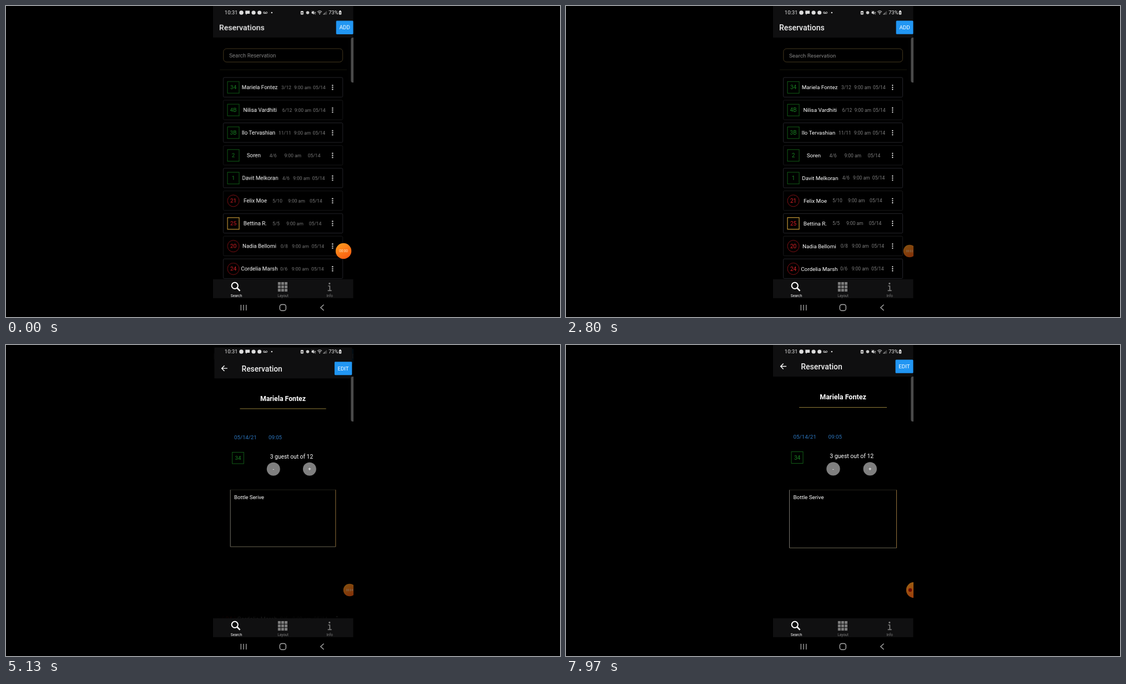
Animation, 998 px wide and 561 px high, one loop 8 s. Source, as an HTML page:

```html
<!DOCTYPE html>
<html lang="en">
<head>
<meta charset="utf-8">
<title>Reservations</title>
<style>
  html, body { margin: 0; width: 100%; height: 100%; overflow: hidden; background: #000; }
  svg { display: block; width: 998px; height: 561px; font-family: Roboto, sans-serif; }
  .screen { transform-origin: 499px 247px; }
</style>
</head>
<body>
<svg id="stage" viewBox="0 0 998 561"></svg>
<script>
const LOOP = 8000;
const GREEN = '#1a8423', RED = '#dc2026', GOLD = '#d8a63c', GRAY = '#7c7c7c';

const text = (x, y, s, size, fill = '#fff', more = '') =>
  `<text x="${x}" y="${y}" font-size="${size}" fill="${fill}" ${more}>${s}</text>`;
const mid = (x, y, s, size, fill, more = '') =>
  text(x, y, s, size, fill, `text-anchor="middle" ${more}`);
const rect = (x, y, w, h, fill, more = '') =>
  `<rect x="${x}" y="${y}" width="${w}" height="${h}" fill="${fill}" ${more}/>`;
const circle = (x, y, r, fill, more = '') =>
  `<circle cx="${x}" cy="${y}" r="${r}" fill="${fill}" ${more}/>`;
const path = (d, stroke, width = 1, more = '') =>
  `<path d="${d}" fill="none" stroke="${stroke}" stroke-width="${width}" ${more}/>`;

function badge(x, y, label, kind) {
  const outline = kind === 'circle'
    ? circle(x, y, 10.5, 'none', 'stroke="#a0161b" stroke-width=".8"')
    : rect(x - 10.5, y - 10.5, 21, 21, 'none', kind === 'gold'
      ? `stroke="${GOLD}" stroke-width="1.1"`
      : 'stroke="#14661a" stroke-width=".9"');
  return outline + mid(x, y + 3.6, label, 10, kind === 'green' ? GREEN : RED);
}

// badge, kind, name, name centre, guests, then x of guests, time and date
const rows = [
  ['34', 'green', 'Mariela Fontez', 457, '3/12', 496, 519, 553],
  ['4B', 'green', 'Nilisa Vardhiti', 457.7, '6/12', 497.5, 519.5, 553],
  ['3B', 'green', 'Ilo Tervashian', 454.8, '11/11', 491, 518.7, 552.5],
  ['2', 'green', 'Soren', 446.3, '4/6', 474.5, 501.5, 543.7],
  ['1', 'green', 'Davit Melkoran', 457.8, '4/6', 497.7, 517, 551.7],
  ['21', 'circle', 'Felix Moe', 449, '5/10', 480, 508, 547],
  ['25', 'gold', 'Bettina R.', 448.8, '5/5', 480, 505, 545.7],
  ['20', 'circle', 'Nadia Bellomi', 456.3, '0/8', 494.7, 515, 550.5],
  ['24', 'circle', 'Cordelia Marsh', 456.3, '0/6', 494, 514.7, 550],
];

function row([label, kind, name, nameX, guests, guestsX, timeX, dateX], i) {
  const y = 146.8 + 40.9 * i;
  const info = (x, s) => text(x, y + 3, s, 8.5, GRAY);
  return rect(391.5, y - 17.8, 215, 35.3, 'none',
      `rx="2" stroke="${i % 2 ? '#1c1c1e' : '#2a2a30'}" stroke-width=".9"`) +
    badge(409.5, y, label, kind) + mid(nameX, y + 3.5, name, 9.84, '#fff') +
    info(guestsX, guests) + info(timeX, '9:00 am') + info(dateX, '05/14') +
    [-3.7, 0, 3.7].map(d => circle(588.3, y + d, 1.15, '#eee')).join('');
}

const page = (id, body) =>
  `<g id="${id}" class="screen">${rect(373, 0, 252.5, 493, '#000')}${rect(373, 0, 252.5, 57, '#0f0f10')}${body}</g>`;
const title = (x, s) => text(x, 44, s, 14, '#f2f2f2', 'font-weight="500"');
const action = (x, s) => rect(x, 26.5, 625.5 - x, 24.3, '#2196f3', 'rx="1.5"') +
  mid((x + 625.5) / 2, 42.2, s, 9.84, '#fff');

const list = page('list',
  title(384, 'Reservations') + action(594.6, 'ADD') +
  rect(391.8, 77, 214.6, 24, 'none', 'rx="5.5" stroke="#4d3f22" stroke-width=".9"') +
  text(402, 92.7, 'Search Reservation', 9.84, '#858585') +
  path('M385 115H614', '#17170c') + rows.map(row).join(''));

const stepper = (x, s) => circle(x, 223.4, 12.2, '#7f7f7f') + mid(x, 226.6, s, 9.5, '#fff');
const detail = page('detail',
  path('M397 38.5H386.8M391.6 33.5L386.6 38.5L391.6 43.5', '#fff', 1.4) +
  title(423.3, 'Reservation') + action(593.5, 'EDIT') +
  mid(499, 98.2, 'Mariela Fontez', 12.5, '#fff', 'font-weight="700"') +
  path('M420 112.6H578', '#94803a') +
  text(409.5, 169, '05/14/21', 9.84, '#2c76bf') + text(472.5, 169, '09:05', 9.84, '#2c76bf') +
  badge(416.5, 203, '34', 'green') +
  mid(514.7, 204, '3 guest out of 12', 10.5, '#fff') +
  stepper(481.4, '-') + stepper(547.7, '+') +
  path('M402.5 261.5H595.5', '#22211a') + path('M402.5 261.5V366', '#77746c') +
  path('M402.5 366H595.5', '#6c6653') + path('M595.5 261.5V366', '#94723c') +
  text(409.5, 278.4, 'Bottle Serive', 9.84));

const status =
  text(393.8, 15.4, '10:31', 9.5, '#e6e6e6') +
  circle(424, 12, 3.8, '#ddd') +
  '<path d="M431.2 8.5H439V14H434.5L432.3 16V14H431.2Z" fill="#ddd"/>' +
  circle(446, 12, 3.6, '#ddd') + circle(456.6, 12, 3.6, '#ddd') +
  path('M465 13.3H469.3', '#ccc') +
  [465, 469.3].map(x => circle(x, 12, 1.5, 'none', 'stroke="#ccc" stroke-width=".9"')).join('') +
  circle(478.8, 12, 1.3, '#ddd') +
  rect(530.8, 9, 5, 6.5, '#ddd', 'rx="1"') + rect(532.3, 11.2, 2, 2.3, '#222') +
  circle(543.4, 12, 2.8, '#ccc') +
  '<path d="M550.5 10.5H552L554.5 8.5V15.5L552 13.5H550.5Z" fill="#ddd"/>' +
  path('M551 8.5L557.5 15.5M555.5 10.5L558 13.5M558 10.5L555.5 13.5', '#ddd', .8) +
  path('M561 10.6Q565 7 569 10.6M562.6 12.5Q565 10.3 567.4 12.5', '#ccc', 1.1) + circle(565, 14.3, 1, '#ccc') +
  [0, 1, 2, 3].map(i => rect(571.5 + i * 1.7, 14 - i * 1.5, 1.1, 1.6 + i * 1.5, i < 2 ? '#bbb' : '#666')).join('') +
  text(581, 15.4, '73%', 9.5, '#e6e6e6') +
  rect(599.8, 9, 4.4, 6.6, '#ddd', 'rx=".8"') + rect(601, 8, 2, 1.2, '#ddd') + rect(601.4, 11, 1.2, 2.6, '#222');

const grid = Array.from({ length: 9 }, (_, i) =>
  rect(489.8 + i % 3 * 6.1, 498 + Math.floor(i / 3) * 6.1, 5, 5, GRAY)).join('');
const tabs = rect(373, 493, 252.5, 34.3, '#101011') +
  circle(412.2, 504.4, 5.6, 'none', 'stroke="#fff" stroke-width="2"') +
  path('M416.3 508.5L421.5 513.8', '#fff', 2.5) + grid +
  path('M580.3 505H583.3V513M579.6 513.3H586.6', GRAY, 1.7) + circle(582.8, 500.7, 1.6, GRAY) +
  mid(415, 525, 'Search', 6.6, '#fff') + mid(499, 525, 'Layout', 6.6, GRAY) + mid(583, 525, 'Info', 6.6, GRAY);

const nav = rect(373, 527.3, 252.5, 34, '#000') +
  path('M423.3 539V549.3M428 539V549.3M432.7 539V549.3', '#aaa', 1.3) +
  rect(493.3, 538.5, 11, 11, 'none', 'rx="3.6" stroke="#aaa" stroke-width="1.4"') +
  path('M572.5 538.8L566.8 544L572.5 549.3', '#aaa', 1.4);

const bubble = `<g id="bubble">${circle(0, 0, 14.2, 'url(#orange)')}
  ${mid(0, 2.2, '00:00', 6.3, '#ffe6cc', 'id="clock"')}
  ${circle(-7, 0, 3.2, '#b01208', 'id="stop"')}</g>`;

const stage = document.getElementById('stage');
stage.innerHTML = `<defs>
    <clipPath id="phone"><rect x="373" width="252.5" height="561"/></clipPath>
    <linearGradient id="orange" x1="0" y1="0" x2=".6" y2="1">
      <stop stop-color="#ffa01f"/><stop offset="1" stop-color="#fb5f12"/>
    </linearGradient>
  </defs>
  <rect width="998" height="561" fill="#000"/>
  <g clip-path="url(#phone)">${list}${detail}${status}${tabs}${nav}
    <path d="M626 57H624Q621.3 57 621.3 61V134Q621.3 138 624 138H626Z" fill="#4a4a4a"/>${bubble}</g>`;

// Steps are [ms, style, easing to the next step].
function play(id, steps) {
  const at = ([ms, style, easing = 'linear']) => ({ ...style, easing, offset: ms / LOOP });
  const first = [0, steps[0][1]], last = [LOOP, steps[steps.length - 1][1]];
  return document.getElementById(id).animate([first, ...steps, last].map(at),
    { duration: LOOP, iterations: Infinity });
}

const SNAP = 'cubic-bezier(.20833, .82, .25, 1)';
const OPEN = 5020, DONE = 5310;
const dock = (x, scale, opacity) => ({ transform: `translate(${x}px, 442px) scale(${scale})`, opacity });

const animations = [
  play('list', [
    [OPEN, { transform: 'scale(1)' }, SNAP],
    [DONE, { transform: 'scale(1.1)' }]]),
  play('list', [[5040, { opacity: 1 }], [5140, { opacity: 0 }]]),
  play('detail', [
    [OPEN, { transform: 'scale(.85)' }, SNAP],
    [DONE, { transform: 'scale(1)' }]]),
  play('detail', [[5040, { opacity: 0 }], [5130, { opacity: 1 }]]),
  play('bubble', [
    [1600, dock(608, 1, 1), 'ease-in-out'],
    [2400, dock(619, .8, .52)],
    [7830, dock(619, .8, .52)],
    [7965, dock(627, 1, .62)]]),
  play('clock', [[7830, { opacity: 1 }], [7900, { opacity: 0 }]]),
  play('stop', [[7830, { opacity: 0 }], [7900, { opacity: 1 }]]),
];

const ticks = [1600, 2430, 3430, 5000];
const clock = document.getElementById('clock');
const start = performance.now();
animations.forEach(a => { a.startTime = start; });

function tick() {
  const ms = Math.max(0, performance.now() - start) % LOOP;
  clock.textContent = '00:0' + ticks.filter(t => ms >= t).length;
  requestAnimationFrame(tick);
}
tick();
</script>
</body>
</html>
```
